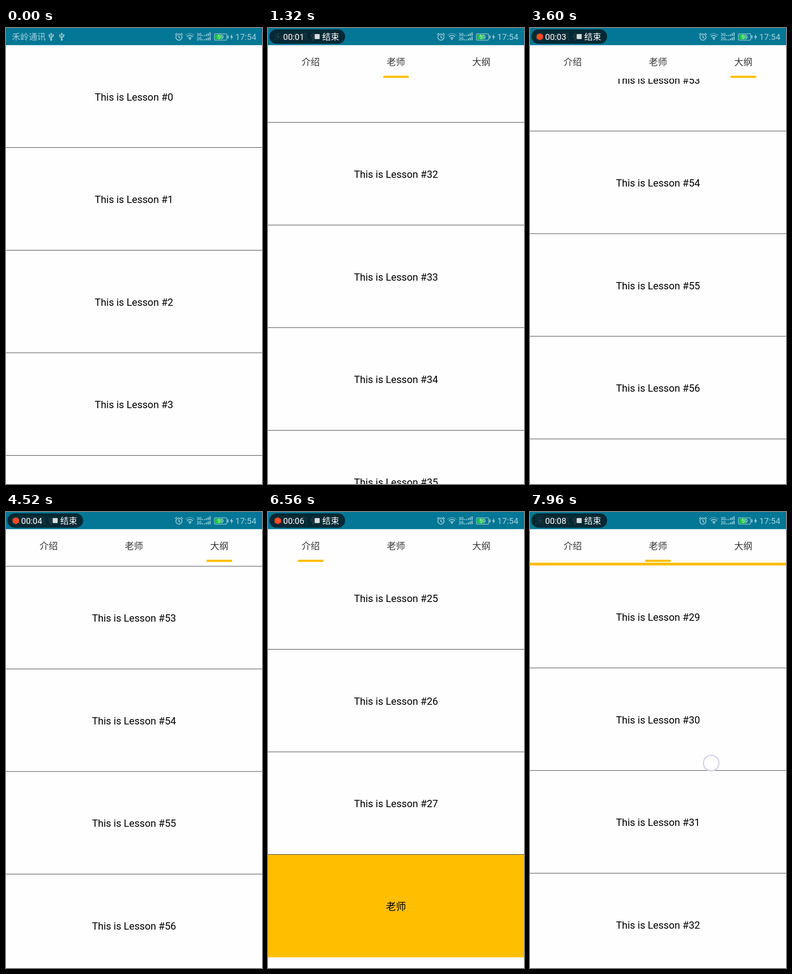
An HTML page that plays this animation: 561 px wide and 998 px high, repeating every 8000 ms.

```html
<!DOCTYPE html>
<html lang="zh-CN">
<head>
<meta charset="utf-8">
<title>Lesson list</title>
<style>
  html, body { margin: 0; width: 100%; height: 100%; overflow: hidden; background: #fefefe; }
  svg { display: block; width: 100%; height: 100%; }
  text { font-family: Roboto, "Noto Sans CJK SC", "Noto Sans CJK", sans-serif; }
  .row text { font-size: 22px; text-anchor: middle; }
  #tabs text { font-size: 20px; text-anchor: middle; fill: #333; }
  #status text, #pill text { font-size: 18.5px; }
  .line { fill: none; stroke: #a6d1dc; stroke-width: 1.7; }
  .solid { fill: #a6d1dc; }
</style>
</head>
<body>
<svg viewBox="0 0 561 998" preserveAspectRatio="none">
  <rect width="561" height="998" fill="#fefefe"/>
  <g id="list"></g>

  <g id="tabs">
    <rect y="37" width="561" height="74" fill="#fefefe"/>
    <text x="93.5" y="82">介绍</text>
    <text x="280.5" y="82">老师</text>
    <text x="467.5" y="82">大纲</text>
    <rect id="mark" y="104.5" width="56" height="4.7" fill="#ffbe00"/>
  </g>

  <g id="ring">
    <circle cx="397" r="17" fill="#fefefe" fill-opacity=".8" stroke="#d6d0ec" stroke-width="2.6"/>
  </g>

  <g id="status">
    <rect width="561" height="37.5" fill="#037795"/>
    <text class="solid" x="13" y="26">禾岭通讯</text>
    <g id="usb">
      <path class="line" stroke-width="1.4" d="M99 13V25M95 16V19.5L99 22.5M103 15.5V18.5L99 21"/>
      <path class="solid" d="M99 10l2.4 4h-4.8zM101.6 14h3v3h-3z"/>
      <circle class="solid" cx="99" cy="25.6" r="2.2"/>
      <circle class="solid" cx="95" cy="15.8" r="1.7"/>
    </g>
    <use href="#usb" x="23.3"/>
    <circle class="line" cx="379" cy="20" r="6.7"/>
    <path class="line" d="M379 16v4.5l3 2M370.5 15l4-3.8M387.5 15l-4-3.8"/>
    <path class="line" opacity=".5" d="M393.5 16.2Q403 7.5 412.5 16.2"/>
    <path class="line" d="M396.5 19Q403 13.2 409.5 19M399.4 22.2Q403 19 406.6 22.2"/>
    <path class="solid" d="M400.5 23.6q2.5-2 5 0L403 26.6z"/>
    <text class="solid" x="418" y="17.5" style="font-size:8.6px;font-weight:700" textLength="0">3G</text>
    <text class="solid" x="418" y="27" style="font-size:8.6px;font-weight:700">2G</text>
    <g id="bars"></g>
    <rect class="line" style="stroke-width:1.2" x="456.6" y="12.6" width="27" height="14" rx="2"/>
    <rect x="458.4" y="14.4" width="14" height="10.4" fill="#1cc83e"/>
    <rect class="solid" x="485.2" y="16" width="2.2" height="7"/>
    <text x="470" y="24.2" fill="#e2f3f2" text-anchor="middle" style="font-size:12.5px">59</text>
    <path class="solid" d="M495.6 12.5l-4.6 8h3l-1.2 6 4.8-8h-3z"/>
    <text class="solid" x="502.5" y="26">17:54</text>
  </g>

  <g id="pill">
    <rect x="3" y="3" width="166" height="31.4" rx="15.7" fill="#04161c" fill-opacity=".8"/>
    <path id="dot" fill="#fb4a25" d="M21.5 11.5l7 3.8v7.6l-7 3.8-7-3.8v-7.6z"/>
    <text id="timer" x="33.3" y="26" fill="#fff"></text>
    <rect x="102.3" y="13.3" width="11" height="11" rx="1" fill="#d9dcdd"/>
    <text x="119" y="26" fill="#fff">结束</text>
  </g>
</svg>
<script>
const NS = "http://www.w3.org/2000/svg";
const LOOP = 8000, STEP = 40, PITCH = 224.6, TOP = 37.5;
const HEADS = { 18: "介绍", 28: "老师", 38: "大纲" };
const $ = id => document.getElementById(id);

// Scroll knots: time in ms, offset in px, speed in px per ms
const KNOTS = [
  [0, 0, 6.3], [1320, 7017.7, 4.3], [2640, 11124.3, 1.9], [3380, 11940, 0],
  [3600, 11940, 0], [4520, 11822.1, -.6], [4700, 11300, -4.2],
  [5720, 7839.5, -2.9], [6560, 5576.3, -2.2], [7000, 5020, 0],
  [7200, 5400, 3], [7700, 6399, .2], [7960, 6433.9, .13]
];

function scrollAt(t) {
  const i = KNOTS.findIndex(k => k[0] > t);
  if (i < 0) return KNOTS[KNOTS.length - 1][1];
  const [t0, s0, v0] = KNOTS[i - 1], [t1, s1, v1] = KNOTS[i];
  const d = t1 - t0, u = (t - t0) / d, w = 1 - u;
  return w * w * ((1 + 2 * u) * s0 + u * d * v0) + u * u * ((3 - 2 * u) * s1 - w * d * v1);
}

function add(parent, name, attrs) {
  const el = document.createElementNS(NS, name);
  for (const k in attrs) el.setAttribute(k, attrs[k]);
  return parent.appendChild(el);
}

const rows = Array.from({ length: 6 }, () => {
  const g = add($("list"), "g", { class: "row" });
  return {
    g,
    fill: add(g, "rect", { width: 561, height: PITCH, fill: "#ffbe00" }),
    line: add(g, "rect", { y: PITCH - .8, width: 561, height: .8 }),
    label: add(g, "text", { x: 280.5, y: 121 })
  };
});

for (const base of [17.5, 27])
  [2, 2, 4, 6, 8].forEach((h, i) =>
    add($("bars"), "rect", { class: "solid", x: 430 + i * 4, y: base - h, width: 2.2, height: h }));

const show = (el, on) => el.setAttribute("visibility", on ? "visible" : "hidden");

function draw(t) {
  const s = scrollAt(t), first = Math.floor(s / PITCH);

  rows.forEach((r, k) => {
    const n = first + k, head = HEADS[n];
    r.g.setAttribute("transform", `translate(0 ${(TOP + n * PITCH - s).toFixed(2)})`);
    show(r.fill, head);
    show(r.line, !head);
    r.label.textContent = head || "This is Lesson #" + n;
  });

  show($("tabs"), first >= 18);
  const tab = first >= 38 ? 2 : first >= 28 ? 1 : 0;
  $("mark").setAttribute("x", 65.5 + tab * 187);

  show($("ring"), t >= 7720);
  $("ring").setAttribute("transform", `translate(0 ${549.5 + 6433.9 - s})`);

  // Recorder badge: the dot blinks in step with the counter
  const clock = t + 60;
  $("pill").setAttribute("opacity", Math.min(1, Math.max(0, (t - 600) / 360)));
  $("timer").textContent = "00:0" + Math.floor(clock / 1000);
  show($("dot"), clock % 1000 >= 500);
}

const start = performance.now();
function tick() {
  const t = (performance.now() - start) % LOOP;
  draw(Math.floor(t / STEP) * STEP);
  requestAnimationFrame(tick);
}
tick();
</script>
</body>
</html>
```
